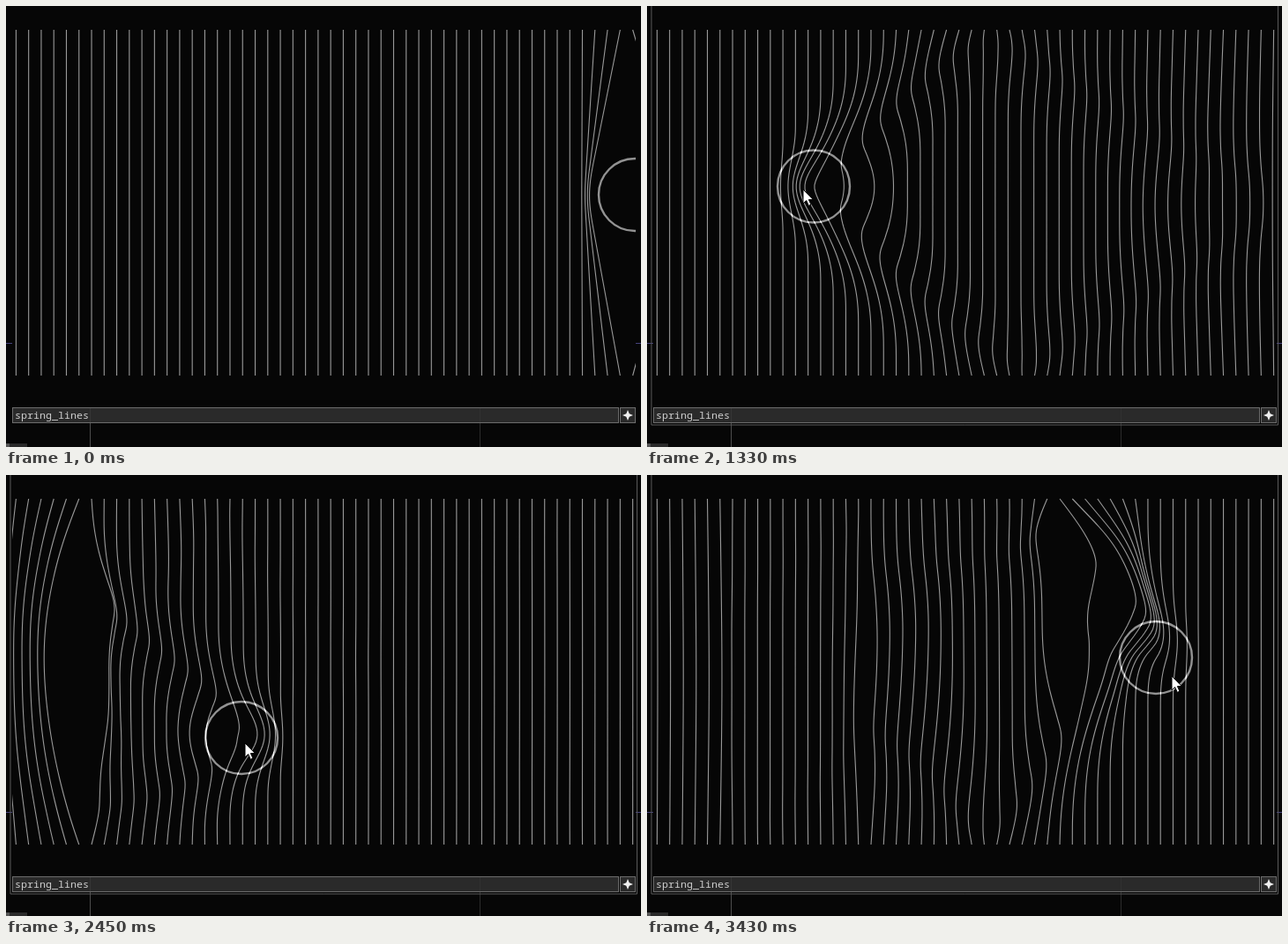
Recreate the animation shown at these times as an HTML page with a canvas. Size 720 px wide and 500 px high, loop 3500 ms.

```html
<!DOCTYPE html>
<html>
<head>
<meta charset="utf-8">
<style>
html, body { margin: 0; width: 100%; height: 100%; overflow: hidden; background: #060606; }
canvas { display: block; }
</style>
</head>
<body>
<canvas id="stage" width="720" height="500"></canvas>
<script>
const g = document.getElementById('stage').getContext('2d');
const LOOP = 3500, FRAME = 70, SUB = 20, DT = FRAME / SUB;

// Strings: vertical, ends fixed, with wave speed, drag and a round repeller.
const LINES = 50, GAP = 14.27, LEFT = 11.4;
const SEGS = 98, TOP = 27, STEP = 4, ROW = SEGS + 1;
const SPEED2 = 0.53 ** 2, DRAG = 0.006, PUSH = 0.0008, REACH = 61, RADIUS = 41;

// Path of the circle: time, x, y.
const path = [
  [0, 713, 214], [140, 711, 217], [280, 707, 223], [420, 698, 228], [490, 682, 228],
  [560, 652, 226], [630, 617, 221], [700, 580, 215.5], [770, 533, 212], [910, 424, 209],
  [1120, 283, 207], [1330, 189, 204.5], [1470, 122, 206], [1540, 92, 212],
  [1610, 66, 222], [1680, 49, 230], [1820, 43, 237], [2100, 43, 238],
  [2170, 72, 250], [2240, 130, 270], [2310, 195, 284], [2380, 248, 292],
  [2450, 267, 298], [2590, 258, 302], [2660, 258, 299], [2730, 268, 291],
  [2870, 330, 236], [3010, 416, 176], [3150, 487, 138], [3290, 507, 130],
  [3360, 534, 162], [3430, 577, 207], [3500, 608, 240]
];

// Smooth curve through the path points.
function circleAt(t) {
  let i = 0;
  while (i < path.length - 2 && path[i + 1][0] <= t) i++;
  const a = path[i], b = path[i + 1];
  const p = path[Math.max(i - 1, 0)], n = path[Math.min(i + 2, path.length - 1)];
  const d = b[0] - a[0], u = (t - a[0]) / d;
  const at = k => {
    const ma = (b[k] - p[k]) / (b[0] - p[0]) * d;
    const mb = (n[k] - a[k]) / (n[0] - a[0]) * d;
    return a[k] + u * ma + u * u * (3 * (b[k] - a[k]) - 2 * ma - mb) +
      u * u * u * (2 * (a[k] - b[k]) + ma + mb);
  };
  return { x: at(1), y: at(2) };
}

const xs = new Float64Array(LINES * ROW), vs = new Float64Array(LINES * ROW);
for (let i = 0; i < LINES; i++) xs.fill(LEFT + i * GAP, i * ROW, (i + 1) * ROW);

function advance(c) {
  for (let i = 0; i < LINES; i++) {
    for (let j = 1; j < SEGS; j++) {
      const k = i * ROW + j;
      let pull = (xs[k - 1] + xs[k + 1] - 2 * xs[k]) / (STEP * STEP);
      const dx = xs[k] - c.x, dy = TOP + j * STEP - c.y, r = Math.hypot(dx, dy);
      if (r < REACH && r > 0) pull += PUSH * (REACH - r) * dx / r;
      vs[k] += (SPEED2 * pull - DRAG * vs[k]) * DT;
    }
  }
  for (let k = 0; k < xs.length; k++) xs[k] += vs[k] * DT;
}

// Settle around the resting circle, then record one loop.
for (let s = 0; s < 1200; s++) advance({ x: Math.min(713, 703 + s / 40), y: 214 });
const poses = [];
for (let f = 0; f < LOOP / FRAME; f++) {
  poses.push(xs.slice());
  for (let s = 0; s < SUB; s++) advance(circleAt(f * FRAME + s * DT));
}

function box(x, y, w, h, color) {
  g.fillStyle = color;
  g.fillRect(x, y, w, h);
}

function shape(points, x, y) {
  g.beginPath();
  points.forEach(([px, py]) => g.lineTo(x + px, y + py));
  g.closePath();
}

function drawStrings(pose, c) {
  g.save();
  g.beginPath();
  g.rect(7, 0, 707, 455);
  g.clip();
  g.globalCompositeOperation = 'lighter';
  g.strokeStyle = '#939393';
  g.lineWidth = 1.1;
  for (let i = 0; i < LINES; i++) {
    g.beginPath();
    for (let j = 0; j < ROW; j++) g.lineTo(pose[i * ROW + j], TOP + j * STEP);
    g.stroke();
  }
  g.strokeStyle = '#8c8c8c';
  g.lineWidth = 2.4;
  g.beginPath();
  g.arc(c.x, c.y, RADIUS, 0, 7);
  g.stroke();
  g.restore();
}

function drawPanel() {
  g.lineWidth = 1;
  g.strokeStyle = '#6c6c6c';
  g.fillStyle = '#2a2a2a';
  for (const [x, w] of [[7.5, 687], [696.5, 17]]) {
    g.fillRect(x, 455.5, w, 17);
    g.strokeRect(x, 455.5, w, 17);
  }
  box(95, 456, 1, 16, '#363636');
  box(95, 473, 1, 27, '#4c4c4c');
  box(537, 456, 1, 16, '#303030');
  box(537, 473, 1, 27, '#2c2c2c');
  box(0, 496, 4, 4, '#555');
  box(4, 496, 20, 4, '#2a2a2a');
  box(0, 382, 7, 1, '#45427c');
  box(714, 382, 6, 1, '#45427c');
  g.font = '11.67px "Noto Sans Mono", "DejaVu Sans Mono", monospace';
  g.fillStyle = '#cfcfcf';
  g.fillText('spring_lines', 10, 468);
  shape([[0, -6], [1.7, -1.7], [6, 0], [1.7, 1.7], [0, 6], [-1.7, 1.7], [-6, 0], [-1.7, -1.7]], 705, 464);
  g.fillStyle = '#f0f0f0';
  g.fill();
}

function drawHover(t, c) {
  const before = circleAt(t - 15), after = circleAt(t + 15);
  g.strokeStyle = '#5a5a5a';
  g.lineWidth = 1;
  g.beginPath();
  g.moveTo(5, 0);
  g.lineTo(5, 475);
  g.lineTo(715.5, 475);
  g.lineTo(715.5, 0);
  g.stroke();
  shape([[0, 0], [0, 16], [3.7, 12.6], [6.3, 18.4], [9, 17.2], [6.4, 11.6], [11.4, 11.6]],
    Math.round(c.x + 2 + after.x - before.x), Math.round(c.y + 4 + after.y - before.y));
  g.strokeStyle = '#000';
  g.fillStyle = '#fff';
  g.fill();
  g.stroke();
}

function draw(now) {
  const f = Math.floor((now % LOOP) / FRAME), t = f * FRAME, c = circleAt(t);
  box(0, 0, 720, 500, '#060606');
  drawStrings(poses[f], c);
  drawPanel();
  if (f > 0) drawHover(t, c);
}

const start = performance.now();
function tick() {
  draw(performance.now() - start);
  requestAnimationFrame(tick);
}
tick();
</script>
</body>
</html>
```
